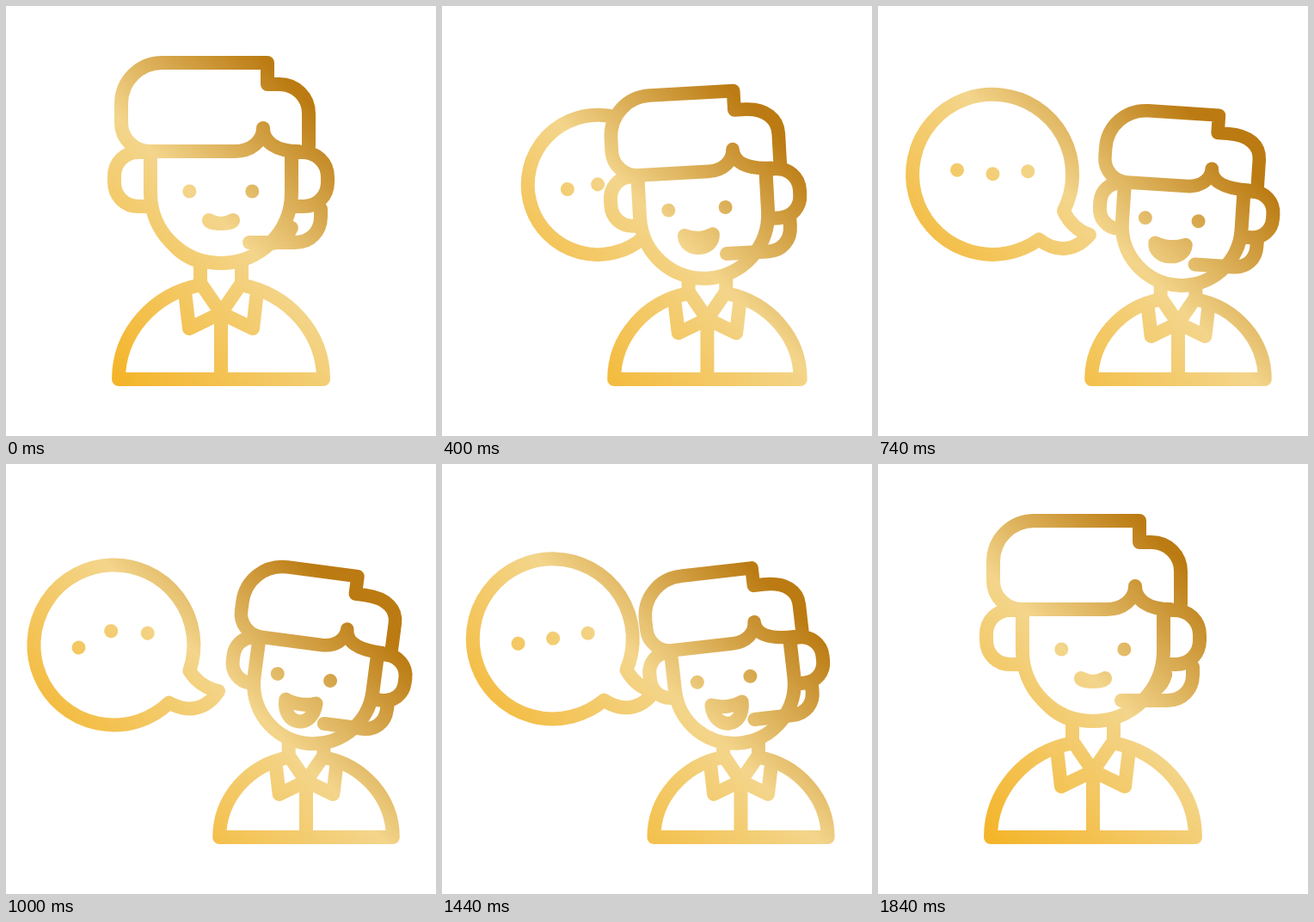
Write an HTML page that moves like this. It is 500 px wide and 500 px high and loops after 2000 ms.

```html
<!DOCTYPE html>
<html lang="en">
<head>
<meta charset="utf-8">
<title>Support agent</title>
<style>
html, body { margin: 0; width: 100%; height: 100%; overflow: hidden; background: #fff; }
svg { display: block; width: 100vw; height: 100vh; }
.ink { stroke: #fff; stroke-linecap: round; stroke-linejoin: round; fill: #000; }
.open { fill: none; }
</style>
</head>
<body>
<svg viewBox="0 0 500 500">
  <defs>
    <linearGradient id="gold" gradientUnits="userSpaceOnUse" x1="100" y1="400" x2="370" y2="130">
      <stop offset="0" stop-color="#f4b52b"/>
      <stop offset=".556" stop-color="#f3d58b"/>
      <stop offset="1" stop-color="#bb7b12"/>
    </linearGradient>
    <!-- White lines show the gradient, black fills hide what lies behind -->
    <mask id="art" maskUnits="userSpaceOnUse" x="0" y="0" width="500" height="500">
      <g id="bubble" class="ink">
        <path d="M79 49A93 93 0 1 0 48 80C67 97 89 97 107 79Q87 70 79 49Z"/>
        <path class="dot" d="M-41 0h.01"/>
        <path class="dot" d="M0 0h.01"/>
        <path class="dot" d="M41 0h.01"/>
      </g>
      <g id="person" class="ink">
        <path stroke="none" d="M131 434A119 112 0 0 1 369 434Z"/>
        <path d="M226 300V322L250 357L274 322V300"/>
        <path class="open" d="M226 324.3A119 112 0 0 0 131 434H369A119 112 0 0 0 274 324.3M250 357V434"/>
        <path class="open" d="M208 332L213 375L250 357L287 375L292 332"/>
        <g id="head">
          <path id="ear" d="M168 233H154C138 233 126 221 126 205V198C126 182 138 170 154 170H168"/>
          <path d="M332 170H344C361 170 374 182 374 199V205C374 221 362 233 346 233H332"/>
          <path id="face"/>
          <path id="mic" class="open" d="M283 275H336C354 275 366 262 366 245V236"/>
          <g id="look">
            <path d="M213.3 215.5h.01M286.3 215.5h.01"/>
            <path id="mouth"/>
          </g>
          <path id="hair"/>
        </g>
      </g>
    </mask>
  </defs>
  <rect width="500" height="500" fill="url(#gold)" mask="url(#art)"/>
</svg>
<script>
const LOOP = 2000, LINE = 16;
const PIVOT = [231.3, 257.2], ARM = [93, 69], HIDDEN = [243, 235];
const $ = id => document.getElementById(id);
const dots = document.querySelectorAll('.dot');
const place = (el, transform) => el.setAttribute('transform', transform);
const shape = (id, d) => $(id).setAttribute('d', d);
const mix = (a, b, k) => a + (b - a) * k;

// Eased value through [time, value] keys
function track(keys, t) {
  const i = keys.findIndex(k => k[0] > t);
  if (i < 0) return keys[keys.length - 1][1];
  if (i === 0) return keys[0][1];
  const [t0, a] = keys[i - 1], [t1, b] = keys[i];
  const u = (t - t0) / (t1 - t0);
  return mix(a, b, u * u * (3 - 2 * u));
}

const slide = [[160, 0], [590, 1], [1410, 1], [1840, 0]];
const reveal = [[160, 0], [590, 1], [1440, 1], [1840, 0]];
const tilt = [[160, 0], [500, -4], [890, 7.5], [1190, 7.5], [1430, -6.5], [1800, 0]];
const talk = [[160, 0], [420, .53], [700, .53], [960, 1], [1410, 1], [1840, 0]];
const swing = [[680, 0], [880, -19], [920, -19], [1160, 5.9], [1420, -8.5]];

function drawHair(p) {
  const x = -13 * p;   // fringe and notch turn with the face
  const r = 48 + 9 * p, k = r * .44;
  shape('hair',
    `M352 163V125C352 106 337 91 ${318 + x} 91H${304 + x}V66` +
    `H${134 + r}C${134 + k} 66 134 ${66 + k} 134 ${66 + r}` +
    `V136C134 154 149 169 167 169H${266 + x}` +
    `C${285 + x} 169 ${299 + x} 157 ${299 + x} 142C${299 + x} 158 ${314 + x} 169 340 169`);
  place($('hair'), `translate(290 150) scale(${1 - .03 * p}) translate(-290 -150)`);
}

function drawFace(p, open) {
  const jaw = 217 + 6 * Math.min(1, open * 2);
  shape('face', `M168 172V${jaw}A82 82 0 0 0 332 ${jaw}V172`);
  const w = 14 + 7 * p, left = 250 - w, right = 250 + w;
  const low = 249 + mix(5.3, 37, open);
  shape('mouth',
    `M${left} 249Q250 257 ${right} 249C${right} ${low} ${left} ${low} ${left} 249Z`);
}

function drawPerson(t) {
  const p = track(slide, t), size = 1 - .153 * p;
  place($('person'), `translate(${250 + 99 * p} 434) scale(${size}) translate(-250 -434)`);
  $('person').setAttribute('stroke-width', LINE / size);
  place($('head'), `rotate(${track(tilt, t)} 250 300)`);
  place($('look'), `translate(${-14 * p} 0)`);
  place($('ear'), `translate(${10 * p} 0)`);
  place($('mic'), `translate(${-11.5 * p} 0)`);
  drawHair(p);
  drawFace(p, track(talk, t));
}

function drawBubble(t) {
  const q = track(reveal, t), size = .69 + .31 * q, turn = track(swing, t);
  const a = turn * Math.PI / 180, c = Math.cos(a), s = Math.sin(a);
  // The bubble swings about a point in its tail
  const x = PIVOT[0] - ARM[0] * c + ARM[1] * s;
  const y = PIVOT[1] - ARM[0] * s - ARM[1] * c;
  place($('bubble'), `translate(${mix(HIDDEN[0], x, q)} ${mix(HIDDEN[1], y, q)}) ` +
    `rotate(${turn - 22 * (1 - q)}) scale(${size})`);
  $('bubble').setAttribute('stroke-width', LINE / size);
  dots.forEach((dot, i) => {
    const d = (t - 860 - 145 * i) / 230;
    const hop = Math.abs(d) < 1 ? Math.cos(d * Math.PI / 2) ** 2 : 0;
    place(dot, `translate(0 ${-16 * hop})`);
  });
}

const start = performance.now();
function draw() {
  const t = (performance.now() - start) % LOOP;
  drawPerson(t);
  drawBubble(t);
  requestAnimationFrame(draw);
}
draw();
</script>
</body>
</html>
```
